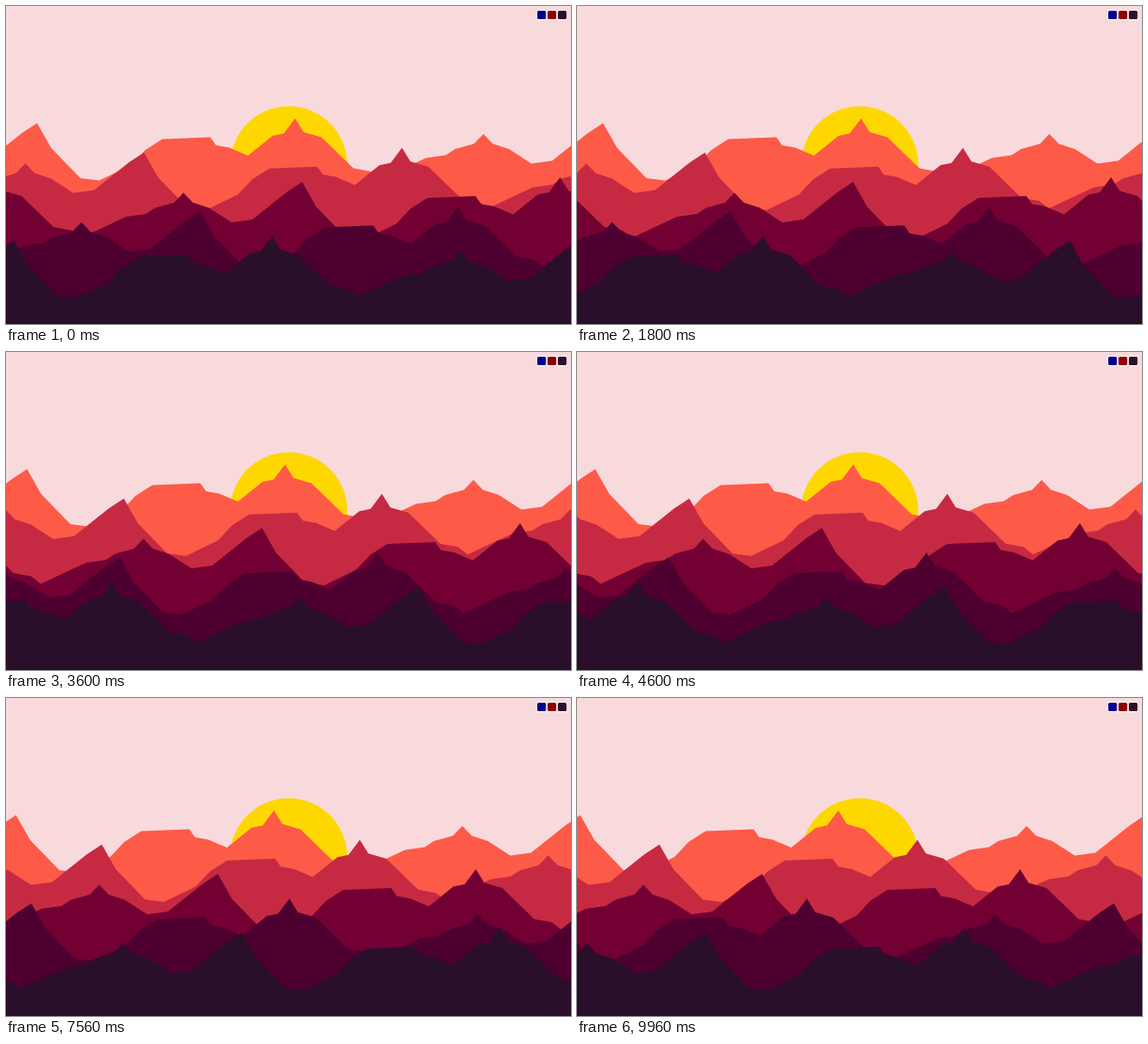
Recreate the animation shown at these times as an HTML page with a canvas. Size 600 px wide and 338 px high, loop 10 s.

```html
<!DOCTYPE html>
<html lang="en">
<head>
<meta charset="utf-8">
<title>Mountain parallax</title>
<style>
  html, body { margin: 0; width: 100%; height: 100%; overflow: hidden; background: #f8dadd; }
  canvas { display: block; width: 600px; height: 338px; }
</style>
</head>
<body>
<canvas id="stage" width="600" height="338"></canvas>
<script>
const ctx = document.getElementById('stage').getContext('2d');
const WIDTH = 600, HEIGHT = 338;
const LOOP = 10000, STEP = 40;
const BASE_SPEED = 2.96; // px per second; doubles with every nearer range
const LAYER_DROP = 31.25;

// Key points of the one ridge line that every range repeats each WIDTH pixels.
const ridge = [
  [17, 135], [33, 124.5], [48, 151], [79, 183], [99, 185.5], // smooth peak and its valley
  [133, 169], [148, 153], [166, 141.5], [217, 139.5],        // plateau
  [223, 148], [237, 150.5], [257, 159], [283, 138], [295, 135.5],
  [307, 119.5], [316, 134], [335, 139.5], [369, 172.5],      // jagged peak
  [388, 176], [398, 184], [446, 161.5], [467, 158.5], [477, 152],
  [497, 146.5], [507, 136], [517, 146.5], [534, 152], [558, 167.5], [580, 164.5]
];

const layers = [
  { color: '#fd5a48', shift: 0 },
  { color: '#c62a42', shift: 113.5 },
  { color: '#720033', shift: 281.5 },
  { color: '#4e0030', shift: 173 },
  { color: '#2a0f2b', shift: -24.5 }
];

const swatches = ['#00008b', '#8b0000', '#2a0f2b'];

function drawSun() {
  ctx.fillStyle = '#ffd700';
  ctx.beginPath();
  ctx.arc(300.2, 168.75, 62.2, 0, Math.PI * 2);
  ctx.fill();
}

function drawLayer({ color, shift }, index, seconds) {
  const offset = shift - BASE_SPEED * 2 ** index * seconds;
  const start = ((offset % WIDTH) + WIDTH) % WIDTH - 2 * WIDTH;
  const drop = index * LAYER_DROP;
  ctx.fillStyle = color;
  ctx.beginPath();
  ctx.moveTo(start, HEIGHT);
  for (let left = start; left < WIDTH * 2; left += WIDTH) {
    for (const [x, y] of ridge) ctx.lineTo(left + x, y + drop);
  }
  ctx.lineTo(WIDTH * 2, HEIGHT);
  ctx.fill();
}

function fillRounded(x, y, size, radius, color) {
  ctx.fillStyle = color;
  ctx.beginPath();
  ctx.roundRect(x, y, size, size, radius);
  ctx.fill();
}

function drawSwatches() {
  swatches.forEach((color, i) => {
    const x = 563.4 + i * 10.94;
    fillRounded(x, 4.1, 10.8, 2.2, '#ffffffd0');
    fillRounded(x + 0.8, 4.9, 9.2, 1.5, color);
  });
}

function draw(now) {
  const seconds = Math.floor((now % LOOP) / STEP) * STEP / 1000;
  ctx.fillStyle = '#f8dadd';
  ctx.fillRect(0, 0, WIDTH, HEIGHT);
  drawSun();
  layers.forEach((layer, i) => drawLayer(layer, i, seconds));
  drawSwatches();
}

const origin = performance.now();
function tick() {
  draw(performance.now() - origin);
  requestAnimationFrame(tick);
}
tick();
</script>
</body>
</html>
```
